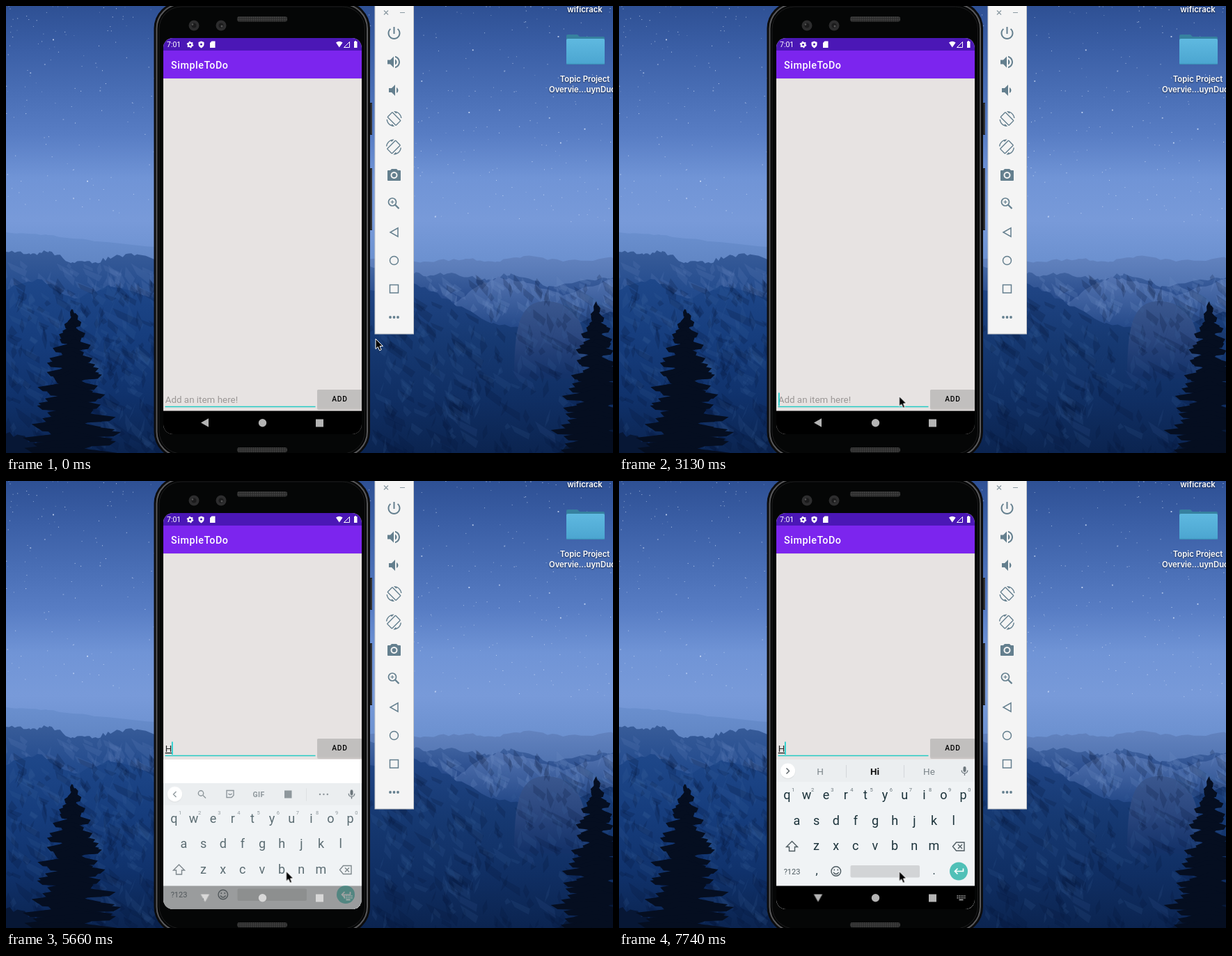
Animation of 872 by 642 pixels, one loop 8 s. Source, as an HTML page with a canvas:

```html
<!DOCTYPE html>
<html lang="en">
<head>
<meta charset="utf-8">
<title>To-do app in a phone emulator</title>
<style>
html, body { margin: 0; width: 100%; height: 100%; overflow: hidden; background: #0c2455; }
canvas, svg { position: absolute; left: 0; top: 0; width: 872px; height: 642px; }
text { font-family: Roboto, sans-serif; white-space: pre; }
.mid { text-anchor: middle; }
.label text { font: 600 11.3px Inter, sans-serif; fill: #fff; text-shadow: 0 1px 2px #0009; }

.anim, .anim * { animation: 8s step-end -4ms infinite; }
#cursor { animation-name: cursor; }
#row { animation-name: row; }
#caret { animation-name: blink; }
#caretPos { animation-name: caretPos; }
#hint { animation-name: until-typing; }
.from-typing { animation-name: from-typing; }
.one { animation-name: one; }
.two { animation-name: two; }
.three { animation-name: three; }
#tools { animation-name: tools; }
#suggestions { animation-name: suggestions; }
#slide { animation-name: slide; }
#keys { animation-name: dim; }
#navShade { animation-name: shade; }
#navIcons { animation-name: navIcons; }
#back { animation-name: back; transform-origin: 286px 598.5px; }
#imeIcon { animation-name: imeIcon; }

@keyframes cursor {
  0% { transform: translate(531px, 478px) }
  1.75% { transform: translate(528px, 480px) }
  3.625% { transform: translate(515px, 489px) }
  5.5% { transform: translate(494px, 505px) }
  7.375% { transform: translate(470px, 524px) }
  9.25% { transform: translate(449px, 539px) }
  11.125% { transform: translate(434px, 549px) }
  13% { transform: translate(425.5px, 553px) }
  14.875% { transform: translate(408px, 559px) }
  16.75%, 100% { transform: translate(402.5px, 560.5px) }
}
@keyframes row { 0% { transform: none } 70.75%, 100% { transform: translateY(-181px) } }
@keyframes blink {
  0%, 7.375%, 20.375%, 33.5%, 46.625%, 57.75%, 74.5%, 89.375% { opacity: 0 }
  1.75%, 14.875%, 27.875%, 39.125%, 52.125%, 65.25%, 80.125%, 95%, 100% { opacity: 1 }
}
@keyframes caretPos {
  0% { transform: none }
  70.75% { transform: translateX(9px) }
  83.75% { transform: translateX(20.3px) }
  95% { transform: translateX(16.6px) }
  96.75%, 100% { transform: translateX(9px) }
}
@keyframes until-typing { 0% { opacity: 1 } 70.75%, 100% { opacity: 0 } }
@keyframes from-typing { 0% { opacity: 0 } 70.75%, 100% { opacity: 1 } }
@keyframes one { 0% { opacity: 1 } 83.75% { opacity: 0 } 96.75%, 100% { opacity: 1 } }
@keyframes two { 0% { opacity: 0 } 95% { opacity: 1 } 96.75%, 100% { opacity: 0 } }
@keyframes three { 0% { opacity: 0 } 83.75% { opacity: 1 } 95%, 100% { opacity: 0 } }
@keyframes tools { 0% { opacity: 1 } 74.5%, 100% { opacity: 0 } }
@keyframes suggestions { 0% { opacity: 0 } 74.5%, 100% { opacity: 1 } }
@keyframes slide { 0% { transform: translateY(33.5px) } 72.625%, 100% { transform: none } }
@keyframes dim { 0% { opacity: .7 } 72.625%, 100% { opacity: 1 } }
@keyframes shade { 0% { opacity: 1 } 70.75% { opacity: .36 } 72.625%, 100% { opacity: 1 } }
@keyframes navIcons { 0% { fill: #b4b4b4 } 70.75% { fill: #d8d8d8 } 72.625%, 100% { fill: #b4b4b4 } }
@keyframes back {
  0% { transform: none }
  67.125% { transform: rotate(15deg) }
  68.875% { transform: rotate(95deg) }
  70.75%, 100% { transform: rotate(270deg) }
}
@keyframes imeIcon { 0% { opacity: 0 } 68.875%, 100% { opacity: 1 } }
</style>
</head>
<body>
<canvas id="scene" width="872" height="642"></canvas>
<svg viewBox="0 0 872 642">
  <defs>
    <clipPath id="screen"><rect x="226" y="46" width="285" height="569" rx="14"/></clipPath>
    <pattern id="mesh" width="3" height="3" patternUnits="userSpaceOnUse">
      <rect width="3" height="3" fill="#2b2b2b"/><circle cx="1.5" cy="1.5" r=".9" fill="#484848"/>
    </pattern>
    <linearGradient id="folder" x2="0" y2="1"><stop stop-color="#5fb9e0"/><stop offset="1" stop-color="#4ba5d0"/></linearGradient>
    <g id="mic"><rect x="-2" y="-6" width="4" height="8" rx="2"/><path d="M-4.3-.5a4.3 4.3 0 0 0 8.6 0M0 4v3" fill="none" stroke="#6b757b" stroke-width="1.3"/></g>
  </defs>

  <!-- desktop -->
  <path d="M805 84V43q0-2 2-2h14l3 3h34q2 0 2 2v38z" fill="#36819f"/>
  <rect x="805" y="47" width="55" height="37" rx="2" fill="url(#folder)"/>
  <path d="M805.5 83.3h54" stroke="#3a8bb2"/>
  <g class="label">
    <text class="mid" x="831.5" y="9">wificrack</text>
    <text class="mid" x="831.5" y="109">Topic Project</text>
    <text x="780" y="124">Overvie...uynDuo</text>
  </g>

  <!-- phone body -->
  <path d="M521 139h5v46h-5zM521 233h5v89h-5z" fill="#1c1c1e"/>
  <path d="M525 140v44M525 234v87" stroke="#4a4a4c"/>
  <rect x="212.500" y="-6" width="310.500" height="656" rx="38" fill="#0c0c0d"/>
  <rect x="216.500" y="-2.500" width="302.500" height="649" rx="35" fill="#050606" stroke="#58585a" stroke-width="2"/>
  <rect x="220" y="1" width="295.500" height="642" rx="32" fill="none" stroke="#1d1d1e"/>
  <rect x="332" y="15" width="72" height="7.500" rx="3" fill="url(#mesh)"/>
  <rect x="332" y="634" width="72" height="7" rx="3" fill="url(#mesh)"/>
  <g fill="#2d2d2e"><circle cx="270" cy="28" r="7.500"/><circle cx="309" cy="28" r="7.500"/></g>
  <g fill="#1b1b1c"><circle cx="270" cy="28" r="3.500"/><circle cx="309" cy="28" r="3.500"/></g>
  <g fill="#555"><circle cx="268" cy="26.500" r="1.200"/><circle cx="310" cy="29" r="1.500"/></g>

  <g clip-path="url(#screen)">
    <rect x="226" y="46" width="285" height="569" fill="#e7e3e2"/>
    <rect x="226" y="46" width="285" height="18" fill="#4b17b6"/>
    <rect x="226" y="64" width="285" height="40" fill="#7c25ee"/>
    <path d="M226 104.500h285" stroke="#d8d3d9"/>
    <g fill="#fff">
      <text x="231" y="59" font-size="10.500">7:01</text>
      <text x="237" y="90" font-size="14.300" font-weight="500" letter-spacing=".55">SimpleToDo</text>
      <circle cx="264.500" cy="55.500" r="2.700" fill="none" stroke="#fff" stroke-width="2.200"/>
      <circle cx="264.500" cy="55.500" r="4.200" fill="none" stroke="#fff" stroke-width="1.200" stroke-dasharray="2 2.400"/>
      <path d="M280.500 50.500l4 1.600v3q0 3.500-4 5.400q-4-1.900-4-5.400v-3zM293 53l2.500-2.500h5v9.500h-7.500zM474 52.500q4.800-3.500 9.600 0L478.800 59.500zM500 51h1v-1h2v1h1.500v9h-4.500z"/>
      <path d="M485.500 59.500h8v-8z" fill="none" stroke="#fff"/>
    </g>
    <circle cx="280.500" cy="55" r="1.600" fill="#4b17b6"/>

    <g class="anim">
      <g id="row">
        <rect x="447" y="552" width="65" height="28" rx="2" fill="#0002"/>
        <rect x="447" y="551" width="64.500" height="26.500" rx="1.500" fill="#c1bfbe"/>
        <text class="mid" x="479.500" y="568" font-size="10.300" font-weight="500" letter-spacing=".75">ADD</text>
        <path d="M228.500 575.500h216" stroke="#25cac4" stroke-width="1.500"/>
        <g font-size="13.400">
          <text id="hint" x="228.700" y="570" fill="#9b9796">Add an item here!</text>
          <g class="from-typing" fill="#222" text-decoration="underline">
            <text class="one" x="228.700" y="570">H</text>
            <text class="two" x="228.700" y="570">He</text>
            <text class="three" x="228.700" y="570">Hel</text>
          </g>
        </g>
        <g id="caretPos"><rect id="caret" x="229" y="555.500" width="1.700" height="18.500" fill="#18cfcd"/></g>
      </g>

      <g class="from-typing">
        <rect x="226" y="400" width="285" height="215" fill="#fff"/>
        <g id="slide">
          <rect x="226" y="400" width="285" height="215" fill="#f0f3f5"/>
          <rect x="226" y="400" width="285" height="32" fill="#ebeef0"/>
          <circle cx="242.500" cy="417" r="11" fill="#0001"/>
          <circle cx="242.500" cy="416.300" r="10.700" fill="#fff"/>
          <use href="#mic" x="496.500" y="416" fill="#6b757b"/>
          <g id="tools" fill="none" stroke="#8e979c" stroke-width="1.400">
            <path d="M244.500 412.500l-4 4l4 4M283 418l4 4M317 411h10v7l-3 3h-7zM319.500 415.500q2.500 3 5 0"/>
            <circle cx="280" cy="415" r="3.700"/>
            <path d="M431.500 408v18" stroke="#dde0e2" stroke-width="1"/>
            <path d="M451 416.500h11" stroke-width="2.500" stroke-linecap="round" stroke-dasharray="0 5.400"/>
            <rect x="400" y="411" width="10.500" height="11" fill="#8e979c" stroke="none"/>
            <text class="mid" x="363" y="420.300" font-size="10.500" font-weight="700" letter-spacing=".4" fill="#8e979c" stroke="none">GIF</text>
          </g>
          <g id="suggestions">
            <path d="M240.500 412.500l4 4l-4 4" fill="none" stroke="#555e63" stroke-width="1.400"/>
            <path d="M326.500 408v18M409.500 408v18" stroke="#d3d7da"/>
          </g>
          <g id="keys" fill="#1b323a"></g>
        </g>
      </g>

      <rect id="navShade" x="226" y="581.500" width="285" height="34"/>
      <g id="navIcons" fill="#b4b4b4">
        <path id="back" d="M280 598.500l11-6.200v12.400z"/>
        <circle cx="368.500" cy="598.700" r="5.700"/>
        <rect x="445" y="593.500" width="11" height="11"/>
        <g id="imeIcon" fill="none" stroke="#b4b4b4" stroke-width="1.500">
          <path d="M485.500 596h12M485.500 598.800h12" stroke-dasharray="1.600 1"/><path d="M488.500 601.500h6"/>
        </g>
      </g>
    </g>
  </g>

  <!-- emulator controls -->
  <rect x="530" y="-2" width="55.500" height="473" fill="#f4f4f4" stroke="#c4c6c8"/>
  <path d="M543 6.500l6 6m0-6l-6 6M566 9.500h7" stroke="#8b9aa2" stroke-width="1.200"/>
  <g fill="#647f8e">
    <path transform="translate(545.500 27)" d="M13 3h-2v10h2V3zm4.830 2.170l-1.420 1.420C17.990 7.860 19 9.810 19 12c0 3.870-3.130 7-7 7s-7-3.130-7-7c0-2.190 1.010-4.140 2.580-5.420L6.170 5.170C4.230 6.820 3 9.260 3 12c0 4.970 4.030 9 9 9s9-4.030 9-9c0-2.740-1.230-5.180-3.170-6.830z"/>
    <path transform="translate(545 68.500)" d="M3 9v6h4l5 5V4L7 9H3zm13.500 3c0-1.770-1.020-3.290-2.500-4.030v8.050c1.480-.73 2.500-2.250 2.500-4.020zM14 3.230v2.060c2.890.86 5 3.540 5 6.710s-2.110 5.850-5 6.710v2.060c4.010-.91 7-4.490 7-8.770s-2.990-7.860-7-8.770z"/>
    <path transform="translate(545 109)" d="M18.500 12c0-1.770-1.020-3.290-2.500-4.030v8.050c1.480-.73 2.500-2.250 2.500-4.020zM5 9v6h4l5 5V4L9 9H5z"/>
    <path id="turn" transform="translate(546.500 151) scale(.92)" d="M16.480 2.520c3.270 1.550 5.610 4.720 5.970 8.480h1.500C23.440 4.840 18.290 0 12 0l-.66.03 3.810 3.810 1.330-1.320zm-6.250-.77c-.59-.59-1.540-.59-2.120 0L1.750 8.110c-.59.59-.59 1.540 0 2.120l12.020 12.020c.59.59 1.540.59 2.120 0l6.360-6.360c.59-.59.59-1.540 0-2.120L10.230 1.750zm4.600 19.440L2.810 9.170l6.360-6.360 12.020 12.020-6.360 6.360zm-7.310.29C4.250 19.940 1.910 16.760 1.550 13H.05C.56 19.160 5.710 24 12 24l.66-.03-3.810-3.810-1.330 1.320z"/>
    <use href="#turn" transform="matrix(-1 0 0 1 1114.500 40.500)"/>
    <path fill-rule="evenodd" d="M554 234h7l2 2h3q1 0 1 1v13q0 1-1 1h-17q-1 0-1-1v-13q0-1 1-1h3zM557.500 238a5 5 0 1 0 .01 0z"/>
    <circle cx="557.500" cy="243" r="3"/>
    <g fill="none" stroke="#647f8e" stroke-width="1.700">
      <circle cx="555" cy="281.500" r="5.500"/>
      <path d="M559 285.500l5.500 5.500" stroke-width="2.300"/>
      <path d="M552.500 281.500h5M555 279v5" stroke-width="1.200"/>
      <path d="M563 318.800v12.400l-11-6.200z" stroke-width="1.500"/>
      <circle cx="557.500" cy="365.500" r="6" stroke-width="1.500"/>
      <rect x="551.500" y="400.500" width="12" height="11.500" stroke-width="1.500"/>
    </g>
    <circle cx="552" cy="447" r="1.900"/><circle cx="557.500" cy="447" r="1.900"/><circle cx="563" cy="447" r="1.900"/>
  </g>

  <g class="anim">
    <path id="cursor" d="M0 0V14.500L3.300 11.500L5.600 16.800L8.200 15.700L6 10.500H10.400Z" stroke="#fff"/>
  </g>
</svg>
<script>
const STEP = 28.15;
const label = (x, y, str, attrs = '') => `<text class="mid" x="${x}" y="${y}" ${attrs}>${str}</text>`;

function keyRow(letters, x, y) {
  return [...letters].map((c, i) => label(x + i * STEP, y, c, 'font-size="18"')).join('');
}

document.getElementById('keys').innerHTML =
  keyRow('qwertyuiop', 241.3, 457) + keyRow('asdfghjkl', 255.5, 493.5) + keyRow('zxcvbnm', 283.5, 530) +
  [...'1234567890'].map((c, i) => label(250 + i * STEP, 445.5, c, 'font-size="7.5" fill="#69757b"')).join('') +
  label(248.5, 564.5, '?123', 'font-size="11" fill="#4d5a60"') +
  label(284, 565, ',', 'font-size="16"') + label(452.5, 565, '.', 'font-size="16"') +
  `<rect x="332.500" y="552" width="99.500" height="17.500" rx="2" fill="#d2d4d6"/>
   <circle cx="488" cy="560.500" r="13" fill="#50c0b7"/>
   <g fill="none" stroke="#4d5a60" stroke-width="1.400">
     <path d="M248.500 517.500l8 8h-4v6h-8v-6h-4zM479.500 525l5-6h11.500v12h-11.500zM487 522l6 6m0-6l-6 6"/>
     <circle cx="311.800" cy="560.500" r="6.800"/><path d="M308 562q3.800 5 7.600 0M309.300 557.500v2M314.300 557.500v2"/>
     <path d="M494.500 556.500v4h-12m4-4l-4 4l4 4" stroke="#fff" stroke-width="1.700"/>
   </g>`;

const words = { one: ['H', 'Hi', 'He'], two: ['He', 'Hey', 'Her'], three: ['Hel', 'Hello', 'Help'] };
for (const [name, [left, best, right]] of Object.entries(words)) {
  document.getElementById('suggestions').insertAdjacentHTML('beforeend', `<g class="${name}" font-size="13.500" fill="#7b8489">
    ${label(289, 421.5, left)}${label(367.5, 421.5, best, 'font-weight="700" fill="#111"')}${label(445.5, 421.5, right)}</g>`);
}

// Night landscape
const ctx = document.getElementById('scene').getContext('2d');
let seed = 7;
const rnd = () => (seed = seed * 16807 % 2147483647) / 2147483647;
const between = (a, b) => a + (b - a) * rnd();

function gradient(y0, y1, ...colors) {
  const g = ctx.createLinearGradient(0, y0, 0, y1);
  colors.forEach((c, i) => g.addColorStop(i / (colors.length - 1), c));
  return g;
}

function ridge(fill, points, rough = 3) {
  ctx.beginPath();
  ctx.moveTo(points[0][0], 642);
  points.forEach(([x, y], i) => {
    ctx.lineTo(x, y);
    const next = points[i + 1];
    if (!next) return;
    for (let k = .12; k < 1; k += .12)
      ctx.lineTo(x + (next[0] - x) * k, y + (next[1] - y) * k + between(-rough, rough));
  });
  ctx.lineTo(points.at(-1)[0], 642);
  ctx.fillStyle = fill;
  ctx.fill();
}

// Slanted rock facets
function crags(count, x0, x1, y0, y1, color) {
  ctx.fillStyle = color;
  for (let i = 0; i < count; i++) {
    const x = between(x0, x1), y = between(y0, y1), len = between(8, 32), lean = between(-.4, 1.1);
    ctx.beginPath();
    ctx.moveTo(x, y);
    ctx.lineTo(x + lean * len + between(2, 9), y + len * .6);
    ctx.lineTo(x + lean * len * 1.2, y + len);
    ctx.lineTo(x + lean * len * .4 - between(1, 5), y + len * .5);
    ctx.fill();
  }
}

function tree(x, top, slope) {
  ctx.fillStyle = '#050e20';
  ctx.fillRect(x - 1.5, top - 3, 3, 210);
  for (let y = top; y < 655; y += 6) for (const side of [-1, 1]) {
    const w = 4 + slope * (y - top) ** .8 * between(.45, 1.1), tip = y + between(-3, 8);
    ctx.beginPath();
    ctx.moveTo(x, y - 7);
    ctx.lineTo(x + side * w * .5, tip - 5);
    ctx.lineTo(x + side * w, tip - 1);
    ctx.lineTo(x + side * w * .85, tip + 5);
    ctx.lineTo(x + side * w * .45, tip + 6);
    ctx.lineTo(x, y + 12);
    ctx.fill();
  }
}

ctx.fillStyle = gradient(0, 370, '#2e5094', '#3b5fa6', '#496eb5', '#587dc4', '#7094d6', '#789ad9', '#6b90cf');
ctx.fillRect(0, 0, 872, 642);
for (let i = 0; i < 480; i++) {
  ctx.fillStyle = `rgba(225,236,255,${between(.25, .85)})`;
  const size = rnd() < .07 ? 1.8 : 1;
  ctx.fillRect(between(0, 872), 310 * rnd() ** 1.4, size, size);
}

ridge(gradient(325, 375, '#6a8fce', '#6085c3'), [[0, 325], [60, 329], [130, 338], [280, 352]], 1);
ridge(gradient(358, 420, '#6383bf', '#4a6eac'), [[480, 359], [600, 367], [660, 363], [705, 367], [745, 359], [800, 367], [872, 362]], 2);
ridge(gradient(352, 642, '#385c99', '#234b8d', '#184084', '#123575', '#0e2c64', '#0b2452'),
  [[0, 353], [35, 357], [62, 352], [95, 368], [125, 369], [155, 360], [190, 357], [280, 390]]);
ridge(gradient(370, 642, '#476aa6', '#26498a', '#173a7a', '#12316b', '#0e2a5f', '#0b2452'),
  [[480, 372], [560, 376], [600, 388], [640, 383], [690, 394], [725, 384], [780, 402], [872, 390]]);
ridge(gradient(390, 470, '#5373b0', '#1f4484'), [[640, 432], [680, 400], [708, 389], [750, 398], [800, 416], [872, 392]], 2);
crags(60, 0, 214, 365, 410, 'rgba(91,124,181,.22)');
crags(70, 590, 872, 385, 430, 'rgba(110,142,197,.22)');
ridge(gradient(395, 642, '#1e4789', '#163d7d', '#10326c', '#0b2450'), [[0, 408], [45, 392], [100, 420], [150, 403], [280, 440]]);
ridge(gradient(400, 642, '#204585', '#163972', '#102f64', '#0b2450'), [[480, 415], [590, 400], [640, 425], [700, 455], [770, 470], [872, 440]]);

ctx.fillStyle = gradient(422, 530, '#3b588f', '#2b477f', '#143269');
ctx.beginPath();
ctx.moveTo(730, 535);
ctx.bezierCurveTo(730, 460, 738, 424, 775, 424);
ctx.bezierCurveTo(820, 424, 838, 460, 835, 535);
ctx.fill();

for (const [x0, x1] of [[0, 214], [520, 872]]) {
  crags(190, x0, x1, 385, 642, 'rgba(5,20,56,.2)');
  crags(130, x0, x1, 400, 620, 'rgba(67,103,165,.14)');
}
ridge('#071735', [[0, 614], [45, 626], [130, 642]], 4);
ridge('#081938', [[790, 642], [830, 622], [872, 600]], 4);
tree(96, 443, 1.05);
tree(848, 431, .9);
</script>
</body>
</html>
```
